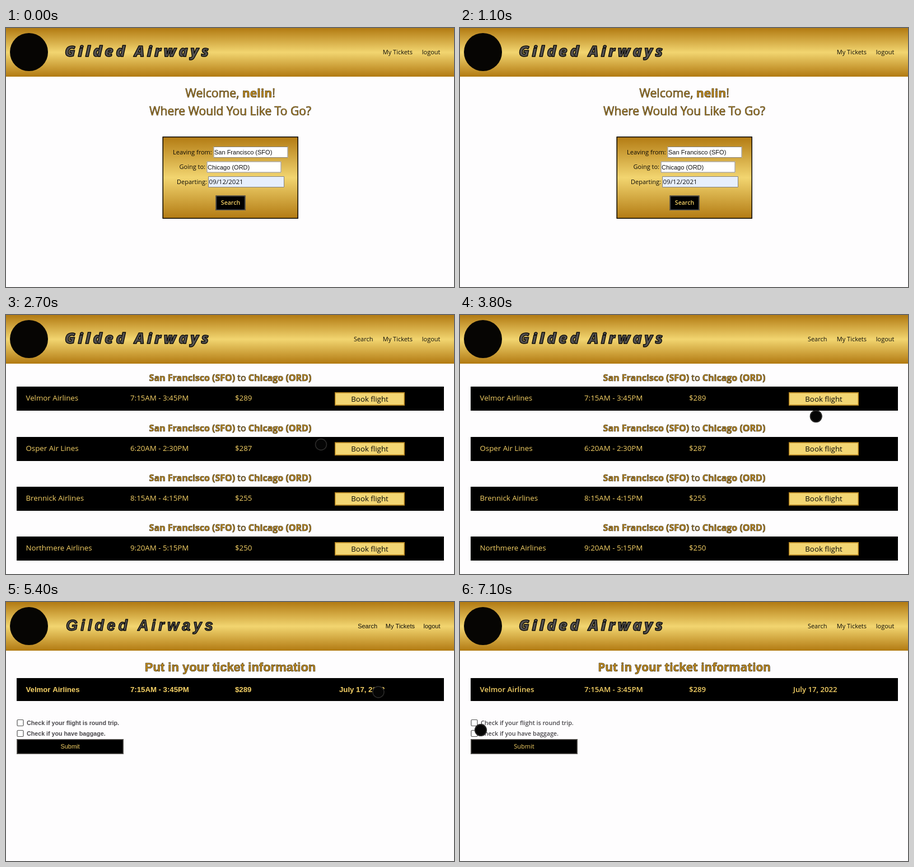
Animation, 800 px wide and 463 px high, one loop 7.2 s. Source, as an HTML page with a canvas:

```html
<!DOCTYPE html>
<html lang="en">
<head>
<meta charset="utf-8">
<title>Flight booking</title>
<style>
  html, body { margin: 0; width: 100%; height: 100%; overflow: hidden; background: #fefdfe; }
  canvas { display: block; width: 800px; height: 463px; }
</style>
</head>
<body>
<canvas id="stage" width="800" height="463"></canvas>
<script>
const ctx = document.getElementById('stage').getContext('2d');
const LOOP = 7200, STEP = 100;
const SANS = '"Open Sans", "Noto Sans", sans-serif';
const ARIAL = '"Liberation Sans", Arial, sans-serif';
const GOLD = '#f4d065', PALE = '#f3d673', DARK_GOLD = '#b27a12';

const RESULTS_AT = 2700, BLANK_AT = 5100, TICKET_AT = 5400, FONT_AT = 5500;

const flights = [
  ['Velmor Airlines', '7:15AM - 3:45PM', '$289'],
  ['Osper Air Lines', '6:20AM - 2:30PM', '$287'],
  ['Brennick Airlines', '8:15AM - 4:15PM', '$255'],
  ['Northmere Airlines', '9:20AM - 5:15PM', '$250']
];
const columns = [35.5, 222, 409, 595];

const easeOut = k => 1 - (1 - k) * (1 - k);
const smooth = k => k * k * (3 - 2 * k);
const moves = [
  { start: 2220, end: 2700, from: [401, 313], to: [562.5, 231.5], ease: easeOut },
  { start: 2700, end: 4400, from: [562.5, 231.5], to: [665, 161], ease: smooth },
  { start: 5500, end: 7100, from: [665, 161], to: [37, 229], ease: smooth }
];

function cursorAt(t) {
  let spot = null;
  for (const m of moves) {
    if (t < m.start) break;
    const k = m.ease(Math.min(1, (t - m.start) / (m.end - m.start)));
    spot = m.from.map((v, i) => v + (m.to[i] - v) * k);
  }
  return spot;
}

function rect(x, y, w, h, fill, border, line = 1) {
  ctx.fillStyle = fill;
  ctx.fillRect(x, y, w, h);
  if (!border) return;
  ctx.strokeStyle = border;
  ctx.lineWidth = line;
  ctx.strokeRect(x + line / 2, y + line / 2, w - line, h - line);
}

function disc(x, y, r, fill) {
  ctx.fillStyle = fill;
  ctx.beginPath();
  ctx.arc(x, y, r, 0, Math.PI * 2);
  ctx.fill();
}

function text(str, x, y, font, color, align = 'left') {
  ctx.font = font;
  ctx.fillStyle = color;
  ctx.textAlign = align;
  ctx.fillText(str, x, y);
}

function outlined(str, x, y, fill, stroke, line) {
  ctx.textAlign = 'left';
  ctx.lineJoin = 'round';
  ctx.fillStyle = fill;
  ctx.fillText(str, x, y);
  ctx.strokeStyle = stroke;
  ctx.lineWidth = line;
  ctx.strokeText(str, x, y);
}

// Centred heading built from [string, weight] runs.
function heading(runs, y, size, face = SANS) {
  const fonts = runs.map(([, weight]) => `${weight} ${size}px ${face}`);
  const widths = runs.map(([str], i) => {
    ctx.font = fonts[i];
    return ctx.measureText(str).width;
  });
  let x = 400.5 - widths.reduce((a, b) => a + b) / 2;
  runs.forEach(([str], i) => {
    ctx.font = fonts[i];
    outlined(str, x, y, '#c18a1b', '#37301f', 0.7);
    x += widths[i];
  });
}

function goldFill(y, h) {
  const g = ctx.createLinearGradient(0, y, 0, y + h);
  g.addColorStop(0, DARK_GOLD);
  g.addColorStop(0.5, '#f2d570');
  g.addColorStop(1, DARK_GOLD);
  return g;
}

function header(face, withSearch) {
  const arial = face === ARIAL;
  rect(0, 0, 800, 87, goldFill(0, 87));
  disc(41, 43, 34, '#060503');
  ctx.font = `italic ${arial ? 700 : 800} 27px ${face}`;
  ctx.letterSpacing = arial ? '5.2px' : '4.6px';
  outlined('Gilded Airways', arial ? 107 : 105, 51, '#55524f', '#0b0b0b', 1.4);
  ctx.letterSpacing = '0px';
  const font = `11px ${face}`;
  text('logout', 775.5, 47, font, '#0c0a05', 'right');
  text('My Tickets', arial ? 730 : 726, 47, font, '#0c0a05', 'right');
  if (withSearch) text('Search', arial ? 663 : 655.5, 47, font, '#0c0a05', 'right');
}

function blackButton(label, x, y, w, h, font) {
  rect(x, y, w, h, '#000', '#5d5b57', 1.5);
  text(label, x + w / 2, y + h / 2 + 3.5, font, GOLD, 'center');
}

function field(label, labelX, x, y, w, value, font, fill) {
  text(label, labelX, y + 13.5, `11px ${SANS}`, '#0c0a05');
  rect(x, y, w, 20, fill, '#85817a', 1);
  text(value, x + 1.5, y + 14, font, '#101010');
}

function searchPage() {
  header(SANS, false);
  heading([['Welcome, ', 400], ['nelin', 700], ['!', 400]], 124, 21.2);
  heading([['Where Would You Like To Go?', 400]], 156, 21);
  rect(279.5, 194, 242.5, 147, goldFill(194, 147), '#0a0905', 1.5);
  field('Leaving from:', 298, 370.5, 212, 133, 'San Francisco (SFO)', `11px ${ARIAL}`, '#fff');
  field('Going to:', 309.5, 358.5, 238.5, 133, 'Chicago (ORD)', `11px ${ARIAL}`, '#fff');
  field('Departing:', 305, 361, 265, 136, '09/12/2021', `11.5px ${SANS}`, '#e7effc');
  blackButton('Search', 374.5, 299.5, 53, 26.5, `600 10.6px ${SANS}`);
}

function resultsPage(cursor) {
  header(SANS, true);
  flights.forEach((flight, i) => {
    const y = 128.3 + i * 89.3;
    heading([['San Francisco (SFO)', 700], [' to ', 400], ['Chicago (ORD)', 700]], y - 10, 16);
    rect(19, Math.round(y), 763, 43, '#000');
    flight.forEach((str, c) => text(str, columns[c], y + 25, `13.3px ${SANS}`, GOLD));
    rect(587, y + 10, 125, 23.5, PALE, '#b8841a', 1.5);
    const [cx, cy] = cursor;
    const hover = cx > 587 && cx < 712 && cy > y + 10 && cy < y + 33.5;
    text('Book flight', 649.5, y + 26.5, `13.3px ${SANS}`, hover ? '#3152b4' : '#0a0906', 'center');
  });
}

function checkbox(y, label, font) {
  ctx.fillStyle = '#fff';
  ctx.strokeStyle = '#555';
  ctx.lineWidth = 1.2;
  ctx.beginPath();
  ctx.roundRect(20, y, 11, 11, 1.5);
  ctx.fill();
  ctx.stroke();
  text(label, 37, y + 9.5, font, '#48464a');
}

function ticketPage(face) {
  const arial = face === ARIAL;
  header(face, true);
  heading([['Put in your ticket information', 700]], 124, arial ? 22 : 20.7, face);
  rect(19, 136, 763, 41, '#000');
  [...flights[0], 'July 17, 2022'].forEach((str, c) =>
    text(str, columns[c], 160.5, `${arial ? 700 : 600} 13.2px ${face}`, GOLD));
  const font = arial ? `700 10.7px ${face}` : `600 10.7px ${face}`;
  checkbox(210.5, 'Check if your flight is round trip.', font);
  checkbox(229.5, 'Check if you have baggage.', font);
  blackButton('Submit', 19, 245, 191, 27, `11px ${face}`);
}

function pointer([x, y]) {
  disc(x, y, 11, '#050505');
  ctx.strokeStyle = '#2e2d2c';
  ctx.lineWidth = 1.4;
  ctx.beginPath();
  ctx.arc(x, y, 10, 0, Math.PI * 2);
  ctx.stroke();
}

function draw(t) {
  const cursor = cursorAt(t);
  rect(0, 0, 800, 463, '#fefdfe');
  if (t < RESULTS_AT) searchPage();
  else if (t < BLANK_AT) resultsPage(cursor);
  else if (t >= TICKET_AT) ticketPage(t < FONT_AT ? ARIAL : SANS);
  if (cursor) pointer(cursor);
}

const begin = performance.now();
function tick() {
  const t = (performance.now() - begin) % LOOP;
  draw(Math.floor(t / STEP) * STEP);
  requestAnimationFrame(tick);
}
tick();
</script>
</body>
</html>
```
